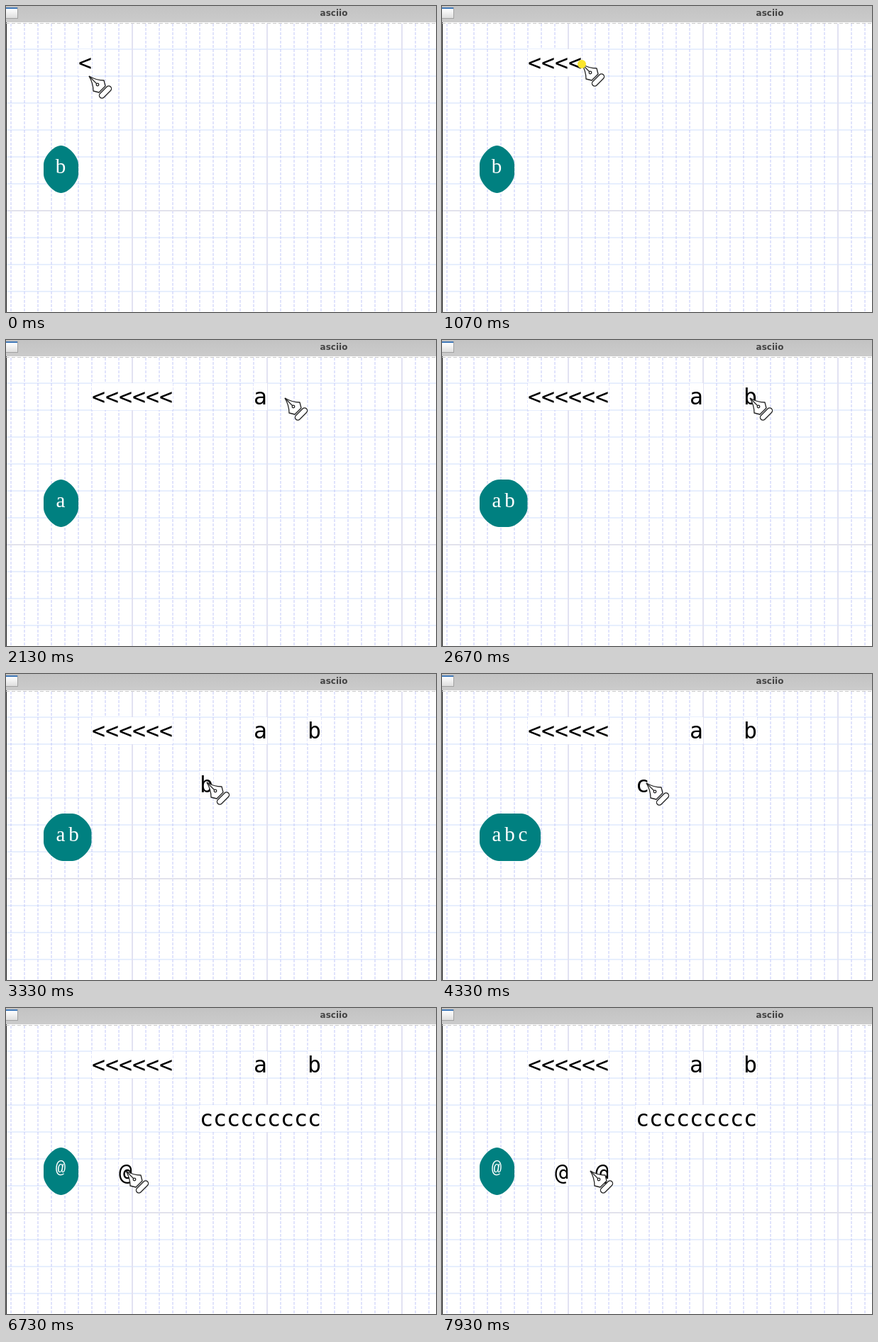
These frames come from a looping animation (606 px wide and 432 px high, 8 s). An HTML page with a canvas:

```html
<!DOCTYPE html>
<html lang="en">
<head>
<meta charset="utf-8">
<title>asciio</title>
<style>
  html, body { margin: 0; width: 100%; height: 100%; overflow: hidden; background: #fff; }
  canvas { display: block; }
</style>
</head>
<body>
<canvas id="stage" width="606" height="432"></canvas>
<script>
const ctx = document.getElementById('stage').getContext('2d');
const W = 606, H = 432, LOOP = 8000, STEP = 1000 / 15;
const CELL_W = 19, CELL_H = 38, LEFT = 7, TOP = 61;
const MONO = '"DejaVu Sans Mono", monospace';

// Pointer path: time, x, y
const PATH = [
  [0, 117, 99], [70, 117, 99], [200, 127, 82], [470, 127, 82], [1067, 197, 82],
  [1270, 233, 82], [1330, 235, 82], [1670, 358, 82], [1870, 358, 82],
  [2133, 393, 82], [2400, 434, 82], [2730, 434, 82], [3230, 283, 153],
  [3333, 283, 153], [3470, 288, 154], [4470, 288, 154], [5000, 436, 154],
  [5070, 436, 154], [5467, 186, 222], [5730, 169, 230], [7270, 169, 230],
  [7600, 222, 230], [7860, 222, 230], [7930, 209, 230], [8000, 209, 230]
];

// Value changes: start time, text
const BADGE = [[0, 'b'], [1470, 'a'], [2330, 'ab'], [3900, 'abc'], [5330, ''], [6530, '@']];
const PREVIEW = [[0, '<'], [470, ''], [1470, 'a'], [1870, ''], [2330, 'b'],
  [3900, 'c'], [4470, ''], [6530, '@']];

// Inked runs; the pen lays them down while it is dragged
const RUNS = [
  { ch: '<', col: 6, row: 0, n: 6, from: 470, to: 1270 },
  { ch: 'a', col: 18, row: 0, n: 1, from: 1870, to: 1980 },
  { ch: 'b', col: 22, row: 0, n: 1, from: 2470, to: 2600 },
  { ch: 'c', col: 14, row: 2, n: 9, from: 4470, to: 5000 },
  { ch: '@', col: 8, row: 4, n: 1, from: 7270, to: 7340 }
];

function valueAt(list, t) {
  return list.filter(item => item[0] <= t).pop()[1];
}

function pointerAt(t) {
  const i = Math.max(1, PATH.findIndex(p => p[0] >= t));
  const [t0, x0, y0] = PATH[i - 1], [t1, x1, y1] = PATH[i];
  const k = Math.max(0, (t - t0) / (t1 - t0));
  return { x: Math.round(x0 + (x1 - x0) * k), y: Math.round(y0 + (y1 - y0) * k) };
}

const colAt = x => Math.floor((x - LEFT - 1) / CELL_W);
const rowAt = y => Math.floor((y - TOP - 1) / CELL_H);

function rule(x0, y0, x1, y1, color, width, dash) {
  ctx.strokeStyle = color;
  ctx.lineWidth = width;
  ctx.setLineDash(dash);
  ctx.beginPath();
  ctx.moveTo(x0, y0);
  ctx.lineTo(x1, y1);
  ctx.stroke();
  ctx.setLineDash([]);
}

// Thin rules sit on pixel edges, so each spreads softly over two pixels
function drawGrid() {
  ctx.fillStyle = '#fff';
  ctx.fillRect(0, 0, W, H);
  for (let y = TOP; y < H; y += CELL_H) rule(1, y, W, y, '#cfdefc', 1, []);
  for (let x = LEFT; x < W; x += CELL_W) rule(x, 25, x, H, '#c2c8f8', 1, [4, 2]);
  for (let x = 178; x < W; x += 190) rule(x, 25, x, H, '#e2e2f2', 2, []);
  rule(1, 289, W, 289, '#e2e2ec', 2, []);
  ctx.fillStyle = '#222';
  ctx.fillRect(0, 18, 1, H);
}

function verticalFade(y0, y1, from, to) {
  const g = ctx.createLinearGradient(0, y0, 0, y1);
  g.addColorStop(0, from);
  g.addColorStop(1, to);
  return g;
}

function drawTitleBar() {
  ctx.fillStyle = verticalFade(0, 23, '#c3c3c3', '#cbcbcb');
  ctx.fillRect(0, 0, W, 23);
  rule(0, 24.5, W, 24.5, '#c8c8c8', 1, [5, 3]);

  ctx.fillStyle = '#a2a2a2';
  ctx.fillRect(0, 2, 17, 16);
  ctx.fillStyle = verticalFade(4, 17, '#ffffff', '#dedede');
  ctx.fillRect(0, 2, 16, 15);
  ctx.fillStyle = '#3f78b8';
  ctx.fillRect(0, 2, 16, 2);

  ctx.font = 'bold 12px "DejaVu Sans", sans-serif';
  ctx.textAlign = 'center';
  ctx.fillStyle = '#444';
  ctx.fillText('asciio', 462, 14);
}

function drawCell(ch, col, row) {
  const x = LEFT + col * CELL_W, y = TOP + row * CELL_H;
  ctx.fillStyle = '#fff';
  ctx.fillRect(x, y, CELL_W, CELL_H);
  ctx.fillStyle = '#000';
  ctx.font = '31.5px ' + MONO;
  ctx.textAlign = 'left';
  ctx.fillText(ch, x, y + 30);
}

function drawRuns(t, pen) {
  for (const { ch, col, row, n, from, to } of RUNS) {
    if (t < from) continue;
    const count = t >= to ? n : Math.min(n, Math.max(1, colAt(pen.x) - col + 1));
    for (let i = 0; i < count; i++) drawCell(ch, col + i, row);
  }
}

function drawBadge(text) {
  if (!text) return;
  const w = 30.5 + 18.5 * text.length, cx = 53 + w / 2, cy = 230.5;
  const a = w / 2, b = 33.5, rx = Math.min(a, 27), ry = 27, bulge = 0.42;
  const cut = 1 - bulge;
  ctx.fillStyle = '#008080';
  ctx.beginPath();
  // Each corner runs between a side and a top or bottom edge
  for (const [sx, sy, fromSide] of [[-1, -1, 1], [1, -1, 0], [1, 1, 1], [-1, 1, 0]]) {
    const at = (u, v) => [cx + sx * (a - rx * u), cy + sy * (b - ry * v)];
    const pts = [at(0, 1), at(0, cut), at(cut, 0), at(1, 0)];
    if (!fromSide) pts.reverse();
    ctx.lineTo(...pts[0]);
    ctx.bezierCurveTo(...pts[1], ...pts[2], ...pts[3]);
  }
  ctx.fill();

  ctx.fillStyle = '#fff';
  ctx.textAlign = 'center';
  ctx.font = text === '@' ? '24px "Liberation Mono", monospace'
                          : '29px "Liberation Serif", serif';
  [...text].forEach((ch, i) => ctx.fillText(ch, 77 + i * 18.5, ch === '@' ? 233 : 236));
}

function drawPen({ x, y }) {
  ctx.save();
  ctx.translate(x, y);
  ctx.fillStyle = '#fff';
  ctx.strokeStyle = '#222';
  ctx.lineWidth = 1.3;
  ctx.lineJoin = 'round';

  ctx.beginPath();
  ctx.moveTo(0, 0);
  ctx.quadraticCurveTo(10, 6, 21, 6);
  ctx.lineTo(23, 14);
  ctx.lineTo(14, 23);
  ctx.lineTo(6, 21);
  ctx.quadraticCurveTo(6, 10, 0, 0);
  ctx.fill();
  ctx.stroke();

  ctx.beginPath();
  ctx.moveTo(0, 0);
  ctx.lineTo(11, 11);
  ctx.stroke();
  ctx.beginPath();
  ctx.arc(12, 12, 1.8, 0, Math.PI * 2);
  ctx.fill();
  ctx.stroke();

  ctx.translate(23, 22.5);
  ctx.rotate(-Math.PI / 4);
  ctx.beginPath();
  ctx.roundRect(-10.5, -3.8, 21, 7.6, 3.8);
  ctx.fill();
  ctx.stroke();
  ctx.restore();
}

function drawClick(t, { x, y }) {
  if (!RUNS.some(r => t >= r.from && t < r.to)) return;
  ctx.fillStyle = '#fbe52c';
  ctx.beginPath();
  ctx.arc(x, y, 6, 0, Math.PI * 2);
  ctx.fill();
}

function draw(t) {
  const pen = pointerAt(t);
  drawGrid();
  drawTitleBar();
  drawRuns(t, pen);
  const ch = valueAt(PREVIEW, t);
  if (ch) {
    const seen = pointerAt(Math.max(0, t - 75)); // the preview trails the pointer
    drawCell(ch, colAt(seen.x), rowAt(seen.y));
  }
  drawBadge(valueAt(BADGE, t));
  drawPen(pen);
  drawClick(t, pen);
}

let start = null;
function tick(now) {
  if (start === null) start = now;
  const t = (now - start) % LOOP;
  draw(Math.min(LOOP - 1, Math.floor((t + 4) / STEP) * STEP));
  requestAnimationFrame(tick);
}
requestAnimationFrame(tick);
</script>
</body>
</html>
```
